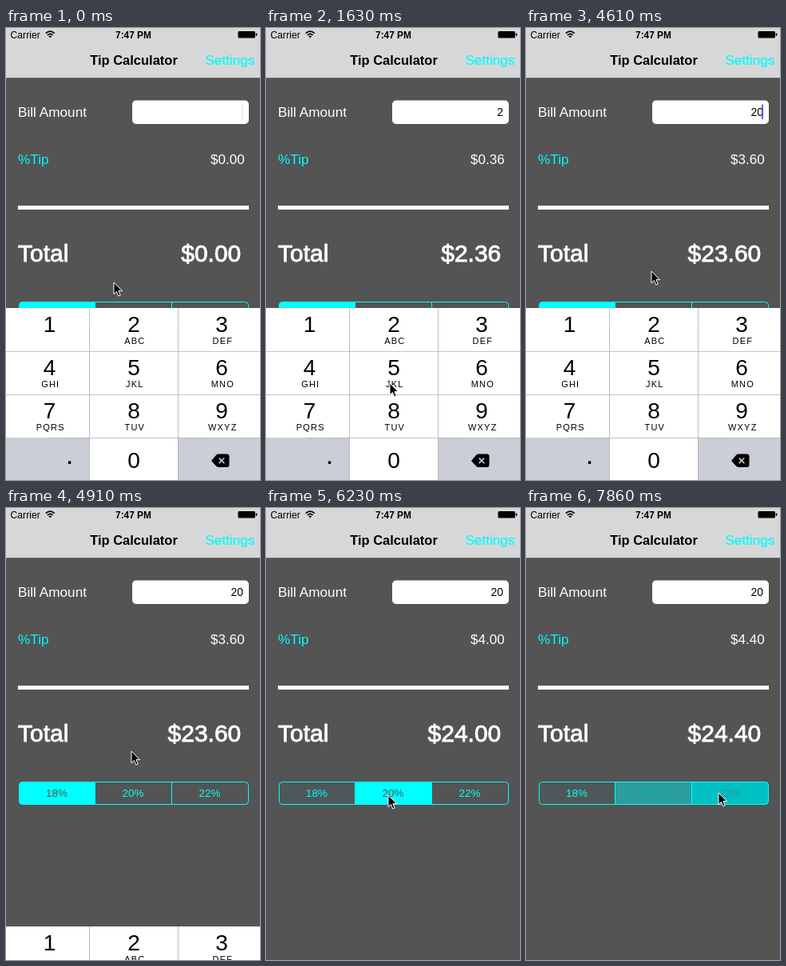
An HTML page that plays this animation: 318x565 px, repeating every 8 s.

```html
<!DOCTYPE html>
<html lang="en">
<head>
<meta charset="utf-8">
<title>Tip Calculator</title>
<style>
html, body { margin: 0; width: 100%; height: 100%; overflow: hidden; background: #545454; }
svg { display: block; width: 100vw; height: 100vh; }
text { font-family: "Liberation Sans", Arial, sans-serif; }
.mid { text-anchor: middle; }
.end { text-anchor: end; }
.bold { font-weight: bold; }
.big { font-size: 30px; fill: #fff; stroke: #fff; stroke-width: .9px; }
.label { font-size: 17.2px; fill: #fff; }
.digit { font-size: 28px; }
.letters { font-size: 11px; letter-spacing: 1.2px; }
</style>
</head>
<body>
<svg id="stage" viewBox="0 0 318 565">
  <rect width="318" height="565" fill="#545454"/>
  <rect width="318" height="62" fill="#d7d7d7"/>
  <rect y="62" width="318" height=".6" fill="#8c8c8c"/>

  <text x="5.5" y="12.5" font-size="12.2">Carrier</text>
  <g fill="none" stroke="#000" stroke-width="1.7">
    <path d="M49.8 6.6Q55.3 1.8 60.8 6.6M51.9 8.8Q55.3 5.9 58.7 8.8"/>
    <path d="M53.3 10.2Q55.3 8.6 57.3 10.2L55.3 12.4Z" fill="#000" stroke="none"/>
  </g>
  <text class="mid bold" x="159.5" y="12.5" font-size="11.9">7:47 PM</text>
  <rect x="290.5" y="4" width="21.5" height="8.5" rx="1.5"/>
  <rect x="312.8" y="6.5" width="1.6" height="3.5" rx=".7"/>

  <text class="mid bold" x="160" y="46" font-size="16.5">Tip Calculator</text>
  <text class="end" x="311.5" y="46" font-size="17.2" fill="#0ff" stroke="#0ff" stroke-width=".2">Settings</text>

  <text class="label" x="15" y="110.5">Bill Amount</text>
  <rect x="158" y="90.5" width="146" height="29.5" rx="5" fill="#fff"/>
  <text id="bill" class="end" x="297" y="110" font-size="14"></text>
  <rect id="caret" x="295.2" y="95.5" width="1.8" height="18.5" fill="#3f62d6"/>

  <text class="label" x="15" y="169.5" style="fill:#0ff">%Tip</text>
  <text id="tip" class="label end" x="298.6" y="169.5" style="font-size:17px"></text>
  <rect x="15" y="222" width="289" height="5" fill="#fff"/>
  <text class="big" x="15" y="292">Total</text>
  <text id="total" class="big end" x="294.3" y="292"></text>

  <g id="segments"></g>
  <g id="pad"></g>
  <path id="cursor" d="M0 0V14.6L3.4 11.5 5.8 17 8.2 16 5.9 10.6H10.5Z" stroke="#fff" stroke-width="1"/>
</svg>
<script>
const LOOP = 8000, STEP = 148.4;
const $ = id => document.getElementById(id);

function add(parent, tag, attrs, text) {
  const node = document.createElementNS("http://www.w3.org/2000/svg", tag);
  for (const key in attrs) node.setAttribute(key, attrs[key]);
  if (text) node.textContent = text;
  parent.appendChild(node);
  return node;
}

// Segmented control
const CYAN = "#00ffff", GREY = "#545454", PRESSED = "#466e6e";
const edges = [16.5, 111.5, 207.5, 303.5];
const fills = [], labels = [];
["18%", "20%", "22%"].forEach((name, i) => {
  const l = edges[i], r = edges[i + 1];
  const shape = [
    `M${r} 342.5H${l + 4}q-4 0 -4 4v20q0 4 4 4H${r}Z`,
    `M${l} 342.5H${r}v28H${l}Z`,
    `M${l} 342.5H${r - 4}q4 0 4 4v20q0 4 -4 4H${l}Z`
  ][i];
  fills.push(add($("segments"), "path", { d: shape, stroke: CYAN }));
  labels.push(add($("segments"), "text", { class: "mid", x: (l + r) / 2 - .5, y: 361, "font-size": 13.4 }, name));
});

// Number pad
const pad = $("pad"), KEY_GREY = "#cbced6";
const cols = [0, 104.5, 215.5, 318], centers = [54.5, 160, 270];
const letters = ["", "ABC", "DEF", "GHI", "JKL", "MNO", "PQRS", "TUV", "WXYZ"];
const keys = {};
for (let i = 0; i < 12; i++) {
  const c = i % 3, row = Math.floor(i / 3), top = 350 + row * 54;
  const name = i < 9 ? i + 1 : [".", 0, "back"][c];
  keys[name] = add(pad, "rect", {
    x: cols[c], y: top, width: cols[c + 1] - cols[c], height: 55,
    fill: i === 9 || i === 11 ? KEY_GREY : "#fff"
  });
  if (i < 9 || i === 10)
    add(pad, "text", { class: "mid digit", x: centers[c], y: i < 9 ? top + 30.3 : 549.7 }, String(name));
  if (letters[i])
    add(pad, "text", { class: "mid letters", x: centers[c] + 1.3, y: top + 45 }, letters[i]);
}
add(pad, "path", {
  d: "M0 404.5H318M0 458.5H318M52 512.5H318M104.5 350V565M215.5 350V565",
  stroke: "#b4b5b9", "stroke-width": .8, fill: "none"
});
add(pad, "text", { class: "mid bold", x: 79.5, y: 545.3, "font-size": 24 }, ".");
add(pad, "path", { d: "M257 541L263 534Q264.3 532.6 266 532.6H276.5Q279.5 532.6 279.5 535.6V546Q279.5 549 276.5 549H266Q264.3 549 263 547.6Z" });
add(pad, "path", { d: "M266.7 537.5l6.6 6.6m0 -6.6l-6.6 6.6", stroke: KEY_GREY, "stroke-width": 1.5 });

// Pointer stops: step, x, y
const path = [
  [0, 135, 318], [1, 136, 322], [4, 147, 366], [6, 150, 376], [8, 150, 376],
  [9, 151, 390], [11, 155, 444], [14, 161, 531], [15, 162, 535], [17, 162, 535],
  [18, 164, 505], [20, 184, 320], [22, 199, 195], [24, 196, 193], [25, 194, 192],
  [26, 194, 192], [27, 175, 250], [28, 157, 304], [33, 157, 304], [35, 156, 318],
  [38, 153, 357], [39, 153, 359], [45, 153, 359], [47, 170, 358], [50, 232, 356], [52, 241, 356], [54, 241, 356]
];
function pointer(k) {
  const i = Math.max(1, path.findIndex(p => p[0] >= k));
  const [k0, x0, y0] = path[i - 1], [k1, x1, y1] = path[i];
  const u = (k - k0) / (k1 - k0);
  return [x0 + (x1 - x0) * u, y0 + (y1 - y0) * u];
}

// Caret blink: the latest entry [step, opacity] holds
const blink = [[0, .15], [1, 0], [3, .5], [4, 1], [10, .4], [11, 0], [14, .5], [15, 1],
  [20, .5], [21, 0], [24, .5], [25, 1], [27, .4], [28, 0], [31, 1], [33, 0]];
const caretAt = k => blink.filter(b => b[0] <= k).pop()[1];

function segmentLook(k) {
  if (k >= 53) return [["#4f5858", CYAN], ["#2a9d9e", "#14b0b1"], ["#00c0c3", "#2a9495"]];
  if (k >= 42) return [["#4f5858", CYAN], [CYAN, GREY], [k >= 52 ? PRESSED : GREY, CYAN]];
  return [[CYAN, GREY], [k >= 40 ? PRESSED : GREY, CYAN], [GREY, CYAN]];
}

function draw(t) {
  const k = Math.floor((t + 8) / STEP);
  const bill = k < 8 ? "" : k < 17 ? "2" : "20";
  const rate = k < 42 ? .18 : k < 53 ? .2 : .22;
  const tip = bill * rate;
  $("bill").textContent = bill;
  $("tip").textContent = "$" + tip.toFixed(2);
  $("total").textContent = "$" + (+bill + tip).toFixed(2);
  $("caret").setAttribute("opacity", caretAt(k));

  segmentLook(k).forEach(([fill, ink], i) => {
    fills[i].setAttribute("fill", fill);
    labels[i].setAttribute("fill", ink);
  });

  keys[2].setAttribute("fill", k === 7 ? KEY_GREY : "#fff");
  keys[0].setAttribute("fill", k === 16 ? KEY_GREY : "#fff");
  const drop = k < 33 ? 0 : k < 35 ? 215 * (1 - .195 ** (k - 32)) : 220;
  pad.setAttribute("transform", `translate(0 ${drop})`);
  $("cursor").setAttribute("transform", `translate(${pointer(k)})`);
}

function tick() {
  draw(performance.now() % LOOP);
  requestAnimationFrame(tick);
}
tick();
</script>
</body>
</html>
```
